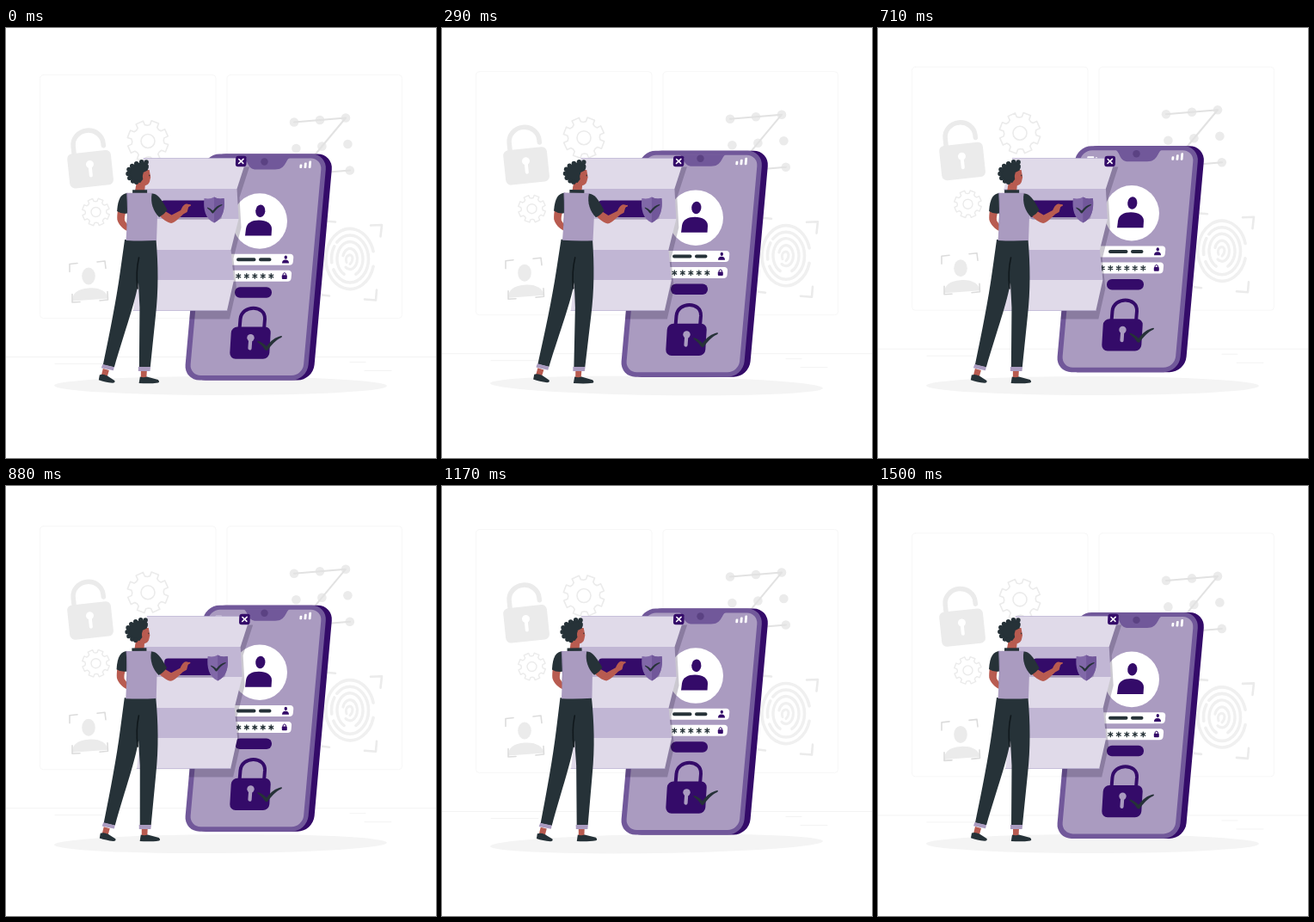
An HTML page with a canvas for the animation above (1540 ms loop, 500 by 500 pixels).

```html
<!DOCTYPE html>
<html lang="en">
<head>
<meta charset="utf-8">
<title>Phone login</title>
<style>
html, body { margin: 0; width: 100%; height: 100%; overflow: hidden; background: #fff; }
canvas { display: block; width: 500px; height: 500px; }
</style>
</head>
<body>
<canvas id="stage"></canvas>
<script>
const canvas = document.getElementById('stage');
const ctx = canvas.getContext('2d');
const ratio = window.devicePixelRatio || 1;
canvas.width = canvas.height = 500 * ratio;

const LOOP = 1540, CYCLE = 1500, STEP = 1000 / 24;
const INK = '#263238', DEEP = '#340b69', RIM = '#71589a', LILAC = '#aa9bc0';
const SKIN = '#b85b50', PALE = '#e0dae9', MID = '#c1b6d4';
const MIST = '#ebebeb', FAINT = '#f0f0f0';

function fill(path, color) {
  ctx.fillStyle = color;
  ctx.fill(new Path2D(path));
}
function line(path, color, width) {
  ctx.strokeStyle = color;
  ctx.lineWidth = width;
  ctx.stroke(new Path2D(path));
}
function ellipse(x, y, rx, ry, color, angle = 0) {
  ctx.fillStyle = color;
  ctx.beginPath();
  ctx.ellipse(x, y, rx, ry, angle, 0, Math.PI * 2);
  ctx.fill();
}
function arc(x, y, rx, ry, from, to, color, width) {
  ctx.strokeStyle = color;
  ctx.lineWidth = width;
  ctx.beginPath();
  ctx.ellipse(x, y, rx, ry, 0, from * Math.PI, to * Math.PI);
  ctx.stroke();
}
function box(x, y, w, h, r, color) {
  ctx.fillStyle = color;
  ctx.beginPath();
  ctx.roundRect(x, y, w, h, r);
  ctx.fill();
}
function group(draw, setup) {
  ctx.save();
  setup();
  draw();
  ctx.restore();
}
// Leans shapes to the right; points on the row `base` stay put.
function lean(base, k = 0.089) {
  ctx.transform(1, 0, -k, 1, k * base, 0);
}
function leaning(base, draw, k) {
  group(draw, () => lean(base, k));
}
function turned(x, y, degrees, draw) {
  group(draw, () => {
    ctx.translate(x, y);
    ctx.rotate(degrees * Math.PI / 180);
    ctx.translate(-x, -y);
  });
}

function ease(x) {
  const curve = (s, a, b) => 3 * (1 - s) ** 2 * s * a + 3 * (1 - s) * s * s * b + s ** 3;
  let lo = 0, hi = 1;
  for (let i = 0; i < 20; i++) {
    const s = (lo + hi) / 2;
    if (curve(s, 0.36, 0.19) < x) lo = s; else hi = s;
  }
  return curve(lo, 0.07, 0.97);
}
function track(stops, p, easing = x => x) {
  const i = stops.findIndex(stop => stop[0] > p);
  const [a, from] = stops[i - 1], [b, to] = stops[i];
  return from + (to - from) * easing((p - a) / (b - a));
}
const FLOAT = [[0, 0], [0.5, -10], [1, 0]];
const SWAY = [[0, 0], [0.25, 1], [0.75, -1], [1, 0]];
const SHAKE = [0, -1, 2, -4, 4, -4, 4, -4, 2, -1, 0].map((x, i) => [i / 10, x]);

function gear(x, y, r, hub, width) {
  const teeth = 8, unit = Math.PI * 2 / teeth;
  ctx.beginPath();
  for (let i = 0; i < teeth; i++) {
    const a = i * unit + 0.36;
    const at = (k, d) => ctx.lineTo(x + Math.cos(a + k * unit) * d, y + Math.sin(a + k * unit) * d);
    at(-0.24, r); at(0.24, r);
    at(0.3, r * 0.8); at(0.5, r * 0.76); at(0.7, r * 0.8);
  }
  ctx.closePath();
  ctx.strokeStyle = MIST;
  ctx.lineWidth = width;
  ctx.stroke();
  arc(x, y, hub, hub, 0, 2, MIST, width);
}

function backdrop() {
  ctx.strokeStyle = '#f7f7f7';
  ctx.lineWidth = 1;
  for (const [x, w] of [[39.5, 204.5], [257, 203.5]]) {
    ctx.beginPath();
    ctx.roundRect(x, 54, w, 283, 4);
    ctx.stroke();
  }
  line('M0 382H500M57 390H112M400 388H418M417 398H448', '#f3f3f3', 1);

  turned(98, 163, -6, () => {
    line('M81 145V135A17.5 16.5 0 0 1 116 135V138', MIST, 5.5);
    box(72.5, 143.5, 51, 40.5, 6, MIST);
    ellipse(98, 158, 4.5, 4.5, '#fff');
    line('M98 160V171', '#fff', 4);
  });
  gear(165, 131, 24, 8, 1.6);
  gear(104.5, 213.5, 16, 5.5, 1.4);

  ellipse(96, 288, 7.8, 10, MIST);
  fill('M77 317C77 308 83 303 96 302C109 301 117 306 119 314Z', MIST);
  line('M74 283V274L83 273M106 271.5L115 270.5L116 279M77 309V318.5L86 318M109 316.5L118.5 315.5L118 306', '#dcdcdc', 1.6);

  for (let row = 0; row < 3; row++)
    for (let col = 0; col < 3; col++)
      ellipse(335 + col * 30 + row * 2.4, 109 - col * 2.5 + row * 30.5, 5.3, 5.3, MIST);
  line('M335 109L395 104L340 170L400 165', '#e2e2e2', 2);

  line('M372 224L383 225M424 229L437 228.5L435.5 242M431 304L430 316L417 315M368 310L376 311', MIST, 2.6);
  arc(400, 268, 28, 35, 0.08, 1.92, FAINT, 3.6);
  arc(400, 268, 21.5, 27.5, -0.75, 0.85, FAINT, 3.6);
  arc(400, 268, 21.5, 27.5, 0.95, 1.18, FAINT, 3.6);
  arc(400, 268, 15, 20, 0.65, 2.35, FAINT, 3.4);
  arc(400, 268, 8.5, 12, -0.9, 0.7, FAINT, 3.2);
  line('M396 272C393 264 402 260 403 267C403 271 401 273 400 274', FAINT, 3);
}

function padlock(x, y, s, color) {
  box(x - 3 * s, y - s, 6 * s, 4.6 * s, s, color);
  arc(x, y - s, 1.9 * s, 2.6 * s, 1, 2, color, s);
}
function check(x, y, scale) {
  group(() => fill('M0 0C4 1 7.500 3.500 10.500 6.500C15.500 -.5 20.500 -4 27.500 -5.800Q29.500 -5.500 27.500 -3.800C20.500 -.5 16.500 4.500 11.500 11Q9.500 12 8 9.500C5.500 5.500 2.500 3.500 0 1.500Z', INK), () => {
    ctx.translate(x, y);
    ctx.scale(scale, scale);
  });
}

function phone() {
  leaning(409, () => {
    box(214, 146, 143, 263, 18, DEEP);
    box(207, 146, 143, 263, 18, RIM);
    box(213, 151, 131.5, 252.5, 13, LILAC);
  });
  fill('M276 150.5H330C325 152 326 164 313 164H291C280 164 282 153 276 150.5Z', RIM);
  ellipse(300.5, 155, 4.2, 4.2, '#5b4283');
  leaning(162, () => {
    for (let i = 0; i < 3; i++) box(341.3 + i * 5.2, 158 - i * 2, 2.8, 4.6 + i * 2, 1, '#fff');
    box(243, 158, 8, 4, 1, '#fff');
    box(252.5, 159, 2.5, 3, 1, '#fff');
  });

  ellipse(295, 224, 32, 32.3, '#fff');
  ellipse(295.8, 212.3, 5.6, 7.3, DEEP, 0.1);
  fill('M278 241L279 233C280 226 286 223 294 223C303 223 309 227 309 233L308.5 241Z', DEEP);

  leaning(275, () => {
    box(230, 262.3, 103.5, 13, 4, '#fff');
    box(230, 281.3, 103, 13, 4, '#fff');
  });
  line('M270 268.8H288.5M296 268.8H306.5', INK, 4);
  ellipse(325.3, 266.2, 1.7, 2.1, DEEP);
  fill('M321 273Q321 269 325 269Q329 269 329 273Z', DEEP);
  padlock(323.8, 287.8, 1, DEEP);
  for (let i = 0; i < 6; i++) {
    const x = 260.8 + i * 9.5;
    line(`M${x} 285.2v5.6M${x - 2.4} 286.6l4.8 2.8M${x - 2.4} 289.4l4.8 -2.8`, INK, 1.3);
  }
  box(266, 300.8, 43, 12.5, 6, DEEP);

  line('M271.5 350L272.5 338C274 321 302 321 301 338L300 350', DEEP, 4);
  leaning(366, () => box(261, 347, 46, 37.3, 7, DEEP), 0.06);
  ellipse(284.5, 359.8, 4.2, 4.2, LILAC);
  line('M284.3 361L283.5 372', LILAC, 4.2);
  check(292.5, 363.3, 1);
}

function paperShape() {
  const rows = [151.5, 187, 222, 258, 293, 328.5];
  const left = [160, 150, 154, 148, 152, 148];
  const right = [280, 268.5, 270.5, 261.5, 265, 257];
  return rows.slice(1).map((bottom, i) =>
    `M${left[i]} ${rows[i]}H${right[i]}L${right[i + 1]} ${bottom}H${left[i + 1]}Z`);
}

function paperShadow(rise, shake) {
  group(() => fill(paperShape().join(''), 'rgba(40,25,60,0.24)'), () => {
    ctx.save();
    ctx.translate(0, rise);
    lean(409);
    ctx.beginPath();
    ctx.roundRect(207, 146, 143, 263, 18);
    ctx.restore();
    ctx.clip();
    ctx.translate(shake + 3, 10);
  });
}

function paper() {
  paperShape().forEach((strip, i) => fill(strip, i % 2 ? MID : PALE));
  line('M160 151.5H279M148 328.5H257', '#b7add0', 0.7);
  box(181, 203, 70, 20, 4, 'rgba(60,40,90,0.25)');
  box(180, 200.5, 70, 19.5, 4, DEEP);

  const shield = 'M242 196.5C245 198.5 249 199 253.5 198C255 211 252 222 242 226.5C232 222 229 211 230.5 198C235 199 239 198.5 242 196.5Z';
  fill(shield, '#8168a8');
  group(() => fill(shield, '#71579a'), () => {
    ctx.beginPath();
    ctx.rect(242, 190, 20, 40);
    ctx.clip();
  });
  check(234, 208.5, 0.62);

  leaning(155, () => box(267, 148.8, 12.6, 12.4, 3, DEEP), 0.04);
  line('M270.8 152.5L275.8 157.3M276 152.3L270.6 157.5', '#fff', 1.6);
}

function person() {
  fill('M113 396L120 398L118 405L111 404Z', SKIN);
  fill('M157 398H164L163.5 407H157Z', SKIN);
  fill('M109 403.5Q113 402 118 404.5L126.5 410Q127.5 412.5 124 412.8C118 412 113 411 108 409.2Z', INK);
  fill('M156 405.5Q160 407 164 405.5L177 409Q179.5 411.5 177 412.5C170 413.6 162 413.5 154.8 413Z', INK);

  fill('M138 246H174.5C177 275 177.5 305 174 335L168 394H155L155.5 325L154 296C150 320 139 350 126 394.5L113 391.5C121 353 128 318 133 282Z', INK);
  line('M154.5 267C152 278 151.5 290 153 303', '#10181c', 1.6);
  fill('M112.5 391L126 394.3L125 398.3L111 395.3Z', LILAC);
  fill('M154 394H168.2L167.6 399H154Z', LILAC);

  fill('M130 211L139.5 213C138 218 137.5 221 138 224L142 230V236.5C136 234 131 229 129.3 223C129 219 129.3 216 130 211Z', SKIN);
  fill('M142 192C134 192 130 198 129 213Q134 216.5 141 215.5Z', INK);

  fill('M152 177L162 179L161 190H150Z', SKIN);
  fill('M147 188.3H164V193H147Z', INK);
  fill('M140.5 191.8H170.5C172 200 174 206 176 216L175 247Q157 248 139.5 247L141 219Z', LILAC);
  line('M140.5 192C142 206 141.5 217 140.5 230', '#8e7fa8', 0.7);

  fill('M178 218L185 213L192.5 217.5L203 212C205 207 208 204 210 204.5L214.5 205.5L212 208.5L210.5 214L206 216.5C202 220 197 226 192 227C187 226 182 222 178 218Z', SKIN);
  line('M207 209L210 206.5M211 207L214 206', SKIN, 1.8);
  fill('M169.5 192.5C176 192.5 180 198 187.5 211.5Q184 217 178 220C171 213 167.500 203 169.5 192.5Z', INK);

  fill('M158 165L166.5 165L168 173.5L167 178C166 182.5 162 184 157 183L154 174Z', SKIN);
  const curls = [[163, 156], [157.5, 155.7], [151.5, 157.7], [146.5, 160.5], [142.8, 164.5], [141.8, 169.5], [143.6, 174.5], [147.5, 178], [151.5, 179.3]];
  fill(`M${curls.join('L')}L156 180L159 176L159.5 168L164.5 165.5L165.5 160Z`, INK);
  for (const [x, y] of curls) ellipse(x, y, 2.7, 2.7, INK);
  ellipse(163, 161.5, 2.6, 3.4, INK);
  ellipse(161, 172.5, 2.3, 3.2, SKIN);
  ellipse(166.6, 171.4, 0.6, 0.9, INK);
}

function draw(time) {
  const index = Math.floor((time % LOOP + 5) / STEP) % 37;
  const p = (30 + index * STEP * 0.98) / CYCLE % 1;
  const rise = track(FLOAT, p) + 0.9;
  const shake = track(SHAKE, p, ease) + 0.2;
  const sway = track(SWAY, p);

  ctx.setTransform(ratio, 0, 0, ratio, 0, 0);
  ctx.fillStyle = '#fff';
  ctx.fillRect(0, 0, 500, 500);
  ctx.lineJoin = ctx.lineCap = 'round';

  group(backdrop, () => ctx.translate(0, rise));
  turned(249.5, 416, sway, () => ellipse(249.5, 416, 193.5, 11, '#f4f4f4'));
  group(phone, () => ctx.translate(0, rise));
  paperShadow(rise, shake);
  group(paper, () => ctx.translate(shake, 0));
  turned(161, 283, sway, person);
}

const start = performance.now();
function tick() {
  draw(performance.now() - start);
  requestAnimationFrame(tick);
}
tick();
</script>
</body>
</html>
```
